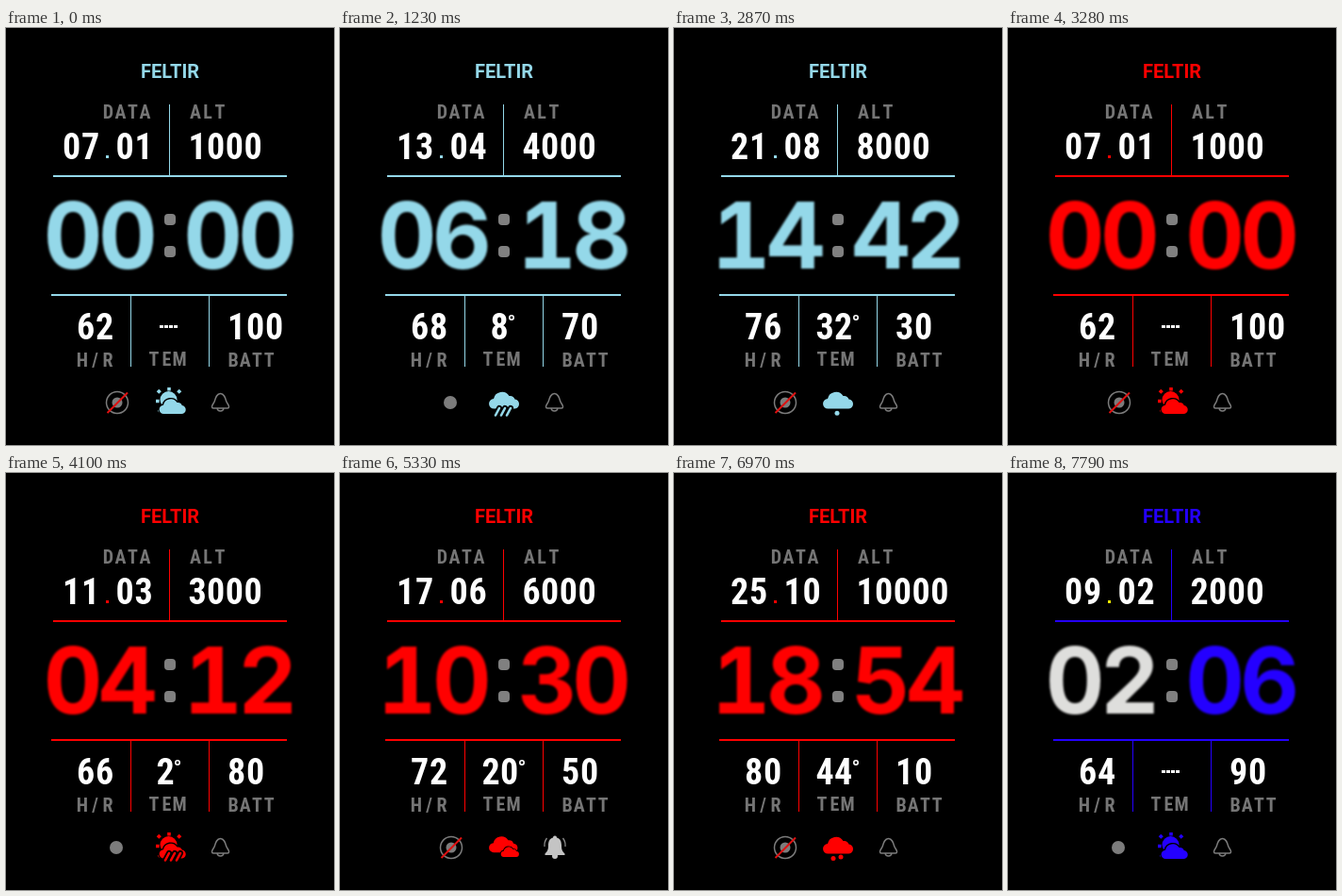
An HTML page for the animation above (8 s loop, 348 by 442 pixels).

```html
<!DOCTYPE html>
<html lang="en">
<head>
<meta charset="utf-8">
<title>Watch face</title>
<style>
  html, body { margin: 0; width: 100%; height: 100%; overflow: hidden; background: #000; }
  svg {
    display: block; width: 100%; height: 100%;
    font-family: "Roboto Condensed", Roboto, "Liberation Sans", sans-serif;
    font-weight: 700; font-stretch: 75%;
    --main: #94d8e9; --hours: #94d8e9; --dot: #94d8e9;
  }
  svg.red { --main: #f00; --hours: #f00; --dot: #f00; }
  svg.blue { --main: #2400ff; --hours: #dededc; --dot: #f2ee00; }
  .main { fill: var(--main); }
  [data-pitch] { text-anchor: middle; }
  .label { font-size: 20px; fill: #757575; }
  .value { font-size: 38px; fill: #fff; }
  .big {
    font: 700 97px Inter, Roboto, sans-serif;
    font-variant-numeric: tabular-nums; filter: blur(.8px);
  }
  .title { font: 700 20px Roboto, sans-serif; text-anchor: middle; }
  .gap { stroke: #000; stroke-width: 3; paint-order: stroke; }
  .ray { stroke: var(--main); stroke-width: 3.6; }
  .rain { stroke: var(--main); stroke-width: 2.6; stroke-linecap: round; }
  .cut { stroke: #000; stroke-width: 6; stroke-linecap: round; }
  .thin { fill: none; stroke: #7c7c7c; stroke-width: 1.5; stroke-linejoin: round; }
</style>
</head>
<body>
<svg id="face" viewBox="0 0 348 442" preserveAspectRatio="none">
  <defs>
    <path id="cloud" d="M5 17.500a5.200 5.200 0 0 1-.5-10.400A9 9 0 0 1 21 4A5.500 5.500 0 0 1 27 7.500A5 5 0 0 1 26 17.500z"/>
    <g id="sun">
      <circle class="main" cx="172.500" cy="394" r="9"/>
      <path class="ray" stroke-dasharray="3.6 99"
        d="M173 381v9M161 384l7 7M185 384l-7 7M159 395.500h9M162 407l5-5"/>
    </g>
  </defs>
  <rect width="348" height="442"/>
  <text class="title main" x="174" y="53">FELTIR</text>

  <g class="label">
    <text data-x="108.500" data-pitch="13" y="96">DATA</text>
    <text data-x="201" data-pitch="13" y="96">ALT</text>
    <text data-x="81" data-pitch="13.500" y="359">H/R</text>
    <text data-x="157" data-pitch="13.500" y="358">TEM</text>
    <text data-x="241" data-pitch="12.700" y="359">BATT</text>
  </g>

  <g class="main">
    <rect x="173" y="81" width="1" height="75"/>
    <rect x="132" y="284" width="1" height="75"/>
    <rect x="215" y="284" width="1" height="75"/>
    <rect x="50" y="156" width="248" height="2"/>
    <rect x="48" y="282" width="250" height="2"/>
  </g>

  <g class="value">
    <text id="day" data-x="69.500" data-pitch="20" y="138.500"></text>
    <text id="month" data-x="126" data-pitch="20" y="138.500"></text>
    <text id="alt" data-x="203" data-pitch="19.700" y="138.500"></text>
    <text id="heart" data-x="84.500" data-pitch="20" y="330"></text>
    <text id="temp" data-pitch="19.500" y="330"></text>
    <text id="batt" data-x="244.500" data-pitch="20" y="330"></text>
  </g>
  <rect x="106" y="135" width="3" height="3" fill="var(--dot)"/>
  <circle id="degree" cy="307" r="2.200" fill="none" stroke="#fff" stroke-width="1.600"/>
  <path id="dashes" d="M163 316.500h19" stroke="#fff" stroke-width="3" stroke-dasharray="4 1"/>

  <text id="hours" class="big" data-x="71" data-pitch="58.300" y="255" fill="var(--hours)"></text>
  <text id="minutes" class="big main" data-x="219.500" data-pitch="58" y="255"></text>
  <g fill="#808080">
    <rect x="168" y="197" width="12" height="12" rx="4"/>
    <rect x="168" y="231" width="12" height="12" rx="4"/>
  </g>

  <g id="linkOn"><circle cx="117" cy="397" r="7" fill="#7c7c7c"/></g>
  <g id="linkOff">
    <circle class="thin" cx="118" cy="397" r="11.500"/>
    <circle cx="118" cy="397" r="5.500" fill="#7c7c7c"/>
    <path d="M107.500 408L129 386.500" stroke="#e01010" stroke-width="2"/>
  </g>
  <g id="weather"></g>
  <g id="bell">
    <path class="thin" d="M227.500 387.500c-4 0-5 4-6 7.500c-.8 3-3 4-3 6.500q0 1.500 1.500 1.500h15q1.500 0 1.500-1.500c0-2.500-2.200-3.500-3-6.500c-1-3.500-2-7.500-6-7.500zM224 403c.5 4 6.500 4 7 0"/>
  </g>
  <g id="ring" fill="#c4c4c4">
    <path d="M228 384.500c-1.500 0-2 1-2 2c-4 1-5 4.500-5 8.500c0 5-1.500 6.500-3.500 8.500v1.500h21v-1.500c-2-2-3.500-3.500-3.500-8.500c0-4-1-7.500-5-8.500c0-1-.5-2-2-2z"/>
    <circle cx="228" cy="406" r="3"/>
    <path fill="none" stroke="#8a8a8a" stroke-width="1.300" d="M219.500 387q-3 4-2.500 9M236.500 387q3 4 2.500 9"/>
  </g>
</svg>
<script>
const STEP = 410, LOOP = 8000;
const $ = id => document.getElementById(id);
const pad = n => String(n).padStart(2, '0');
const show = (id, on) => { $(id).style.display = on ? '' : 'none'; };

// Centres each character in its own cell.
function write(el, text) {
  const { x, pitch } = el.dataset;
  el.textContent = text;
  el.setAttribute('x', [...el.textContent].map((_, i) => +x + i * pitch).join(' '));
}

const cloud = (x, y, s = 1) =>
  `<use href="#cloud" class="main gap" transform="translate(${x} ${y}) scale(${s})"/>`;
const drops = (...spots) =>
  spots.map(([x, y]) => `<circle class="main" cx="${x}" cy="${y}" r="2.5"/>`).join('');
const rain = (...xs) => ['cut', 'rain'].map(c =>
  `<path class="${c}" d="${xs.map(x => `M${x} 403l-4 7.500`).join('')}"/>`).join('');

const sun = '<use href="#sun"/>';
const sky = cloud(158.5, 386);
const sunny = sun + cloud(163, 393.5, .88);
const weather = [
  sunny,
  sunny,
  sun + cloud(163, 393, .88) + rain(173, 179, 185),
  sky + rain(169, 175, 181),
  sky + '<path class="main gap" d="M175 397l-7 9h5l-2 7l8-10h-5l3-6z"/>',
  cloud(158.5, 385.5, .95) + cloud(171, 396.5, .6),
  sky + rain(172, 179),
  sky + drops([173, 408.3]),
  sky + drops([167, 407.5], [173, 408.5], [179, 407.5]),
  sky + drops([169, 408.5], [177, 407])
];

// Each theme restarts the ten readings.
function locate(i) {
  if (i < 8) return ['cyan', i];
  return i < 18 ? ['red', i - 8] : ['blue', i - 18];
}

function draw(i) {
  const [theme, k] = locate(i);
  const degrees = 6 * k - 10;
  const warm = k > 1, single = degrees < 10;
  $('face').setAttribute('class', theme);
  $('temp').dataset.x = single ? 169 : 160;
  const texts = {
    day: pad(7 + 2 * k),
    month: pad(k + 1),
    alt: 1000 * (k + 1),
    heart: 62 + 2 * k,
    temp: warm ? degrees : '',
    batt: 100 - 10 * k,
    hours: pad(2 * k),
    minutes: pad(6 * k)
  };
  for (const id in texts) write($(id), texts[id]);
  $('degree').setAttribute('cx', single ? 182 : 193);
  show('degree', warm);
  show('dashes', !warm);
  const linked = k > 0 && k < 5, ringing = k === 5 || k === 6;
  show('linkOn', linked);
  show('linkOff', !linked);
  show('ring', ringing);
  show('bell', !ringing);
  $('weather').innerHTML = weather[k];
}

document.querySelectorAll('.label text').forEach(el => write(el, el.textContent));

let last = -1;
const start = performance.now();
function tick() {
  const i = Math.floor((performance.now() - start) % LOOP / STEP);
  if (i !== last) draw(last = i);
  requestAnimationFrame(tick);
}
tick();
</script>
</body>
</html>
```
